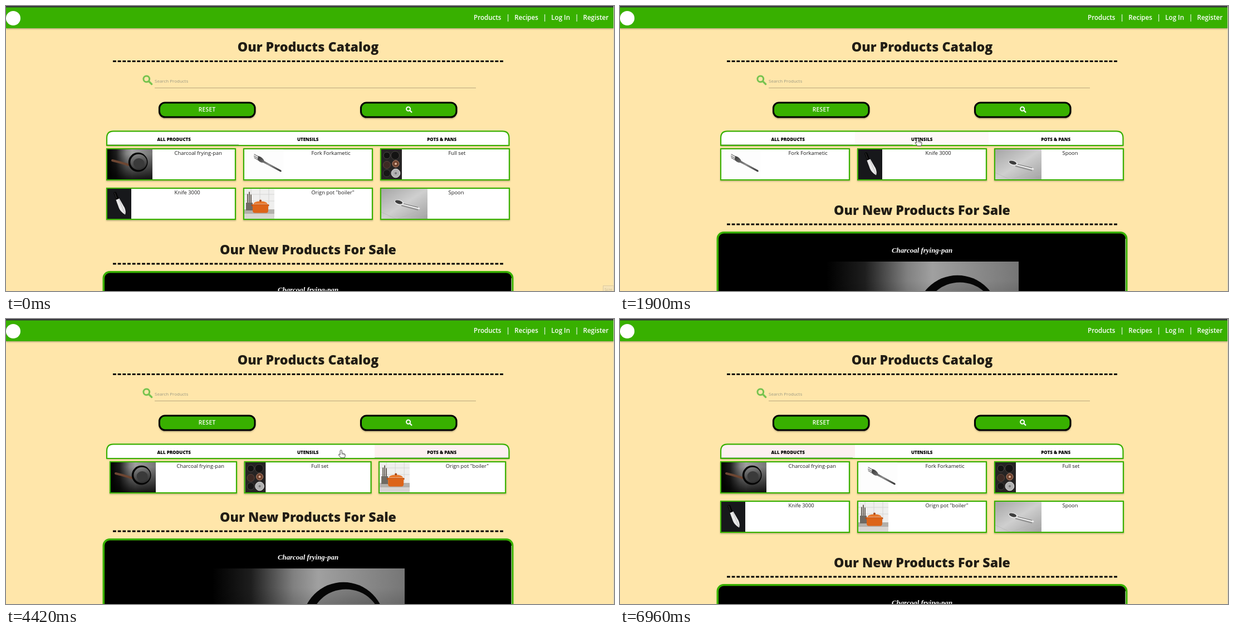
These frames come from a looping animation (1092 by 513 pixels, 7170 ms). An HTML page:

```html
<!DOCTYPE html>
<html lang="en">
<head>
<meta charset="utf-8">
<title>Products catalog</title>
<style>
  html, body { margin: 0; width: 100%; height: 100%; overflow: hidden; background: #ffe6aa; }
  svg { display: block; }
  text { font-family: "Open Sans", sans-serif; }
  .nav { font-size: 11.6px; font-weight: 600; fill: #fff; }
  .head { font-size: 23.2px; font-weight: 800; fill: #211d15; text-anchor: middle; }
  .tab { font-size: 8px; font-weight: 800; fill: #000; text-anchor: middle; }
  .label { font-size: 9.4px; fill: #1c1c1c; }
  .title { font: italic bold 12.9px "Liberation Serif", serif; fill: #fff; text-anchor: middle; }
</style>
</head>
<body>
<svg id="stage" width="1092" height="513" viewBox="0 0 1092 513">
  <defs>
    <linearGradient id="smoke">
      <stop offset="0" stop-color="#000"/><stop offset=".2" stop-color="#1e1e1e"/>
      <stop offset=".42" stop-color="#808080"/><stop offset=".55" stop-color="#a0a0a0"/>
      <stop offset="1" stop-color="#767676"/>
    </linearGradient>
    <linearGradient id="dusk" x2="0" y2="1">
      <stop offset=".15" stop-color="#000" stop-opacity="0"/><stop offset="1" stop-color="#000" stop-opacity=".85"/>
    </linearGradient>
    <linearGradient id="bowl" x2=".3" y2="1">
      <stop offset="0" stop-color="#8a8a8a"/><stop offset=".5" stop-color="#5c5c5c"/>
      <stop offset="1" stop-color="#333"/>
    </linearGradient>
    <linearGradient id="table" x2="1" y2="1">
      <stop offset="0" stop-color="#a5a5a5"/><stop offset=".5" stop-color="#cfcfcf"/>
      <stop offset="1" stop-color="#a2a2a2"/>
    </linearGradient>
    <linearGradient id="steel" x2="1" y2="1">
      <stop offset="0" stop-color="#333"/><stop offset=".5" stop-color="#8c8c8c"/><stop offset="1" stop-color="#333"/>
    </linearGradient>
    <filter id="soft" x="-10%" y="-20%" width="120%" height="160%">
      <feDropShadow dx="0" dy="1.5" stdDeviation="1.2" flood-opacity=".28"/>
    </filter>
  </defs>
</svg>
<script>
const GREEN = '#38b000';
const LOOP = 7170;
const stage = document.getElementById('stage');

const rect = (x, y, w, h, fill, more = '') =>
  `<rect x="${x}" y="${y}" width="${w}" height="${h}" fill="${fill}" ${more}/>`;
const circle = (x, y, r, fill, more = '') =>
  `<circle cx="${x}" cy="${y}" r="${r}" fill="${fill}" ${more}/>`;
const oval = (x, y, rx, ry, fill, more = '') =>
  `<ellipse cx="${x}" cy="${y}" rx="${rx}" ry="${ry}" fill="${fill}" ${more}/>`;
const line = (d, color, width, more = '') =>
  `<path d="${d}" fill="none" stroke="${color}" stroke-width="${width}" ${more}/>`;
const shape = (d, fill, more = '') => `<path d="${d}" fill="${fill}" ${more}/>`;
const text = (cls, x, y, s) => `<text class="${cls}" x="${x}" y="${y}">${s}</text>`;
const round = 'stroke-linecap="round"';

const lens = (x, y, r, w, tail, color) =>
  circle(x, y, r, 'none', `stroke="${color}" stroke-width="${w}"`) +
  line(`M${x + r * .8} ${y + r * .8}l${tail} ${tail}`, color, w * 1.15, round);
const dashes = y => line(`M192 ${y}H893`, '#000', 2.9, 'stroke-dasharray="5.8 2.89"');

// Product pictures, all 54 high
const pictures = {
  pan: [81, rect(0, 0, 81, 54, 'url(#smoke)') + rect(0, 0, 81, 54, 'url(#dusk)') +
    line('M9 20L21 23L38 28', '#6d4632', 4, round) +
    circle(55.2, 23.2, 17.4, '#060606') +
    oval(56.2, 23, 14.8, 14.2, 'url(#bowl)') +
    oval(56.6, 25, 10, 9, '#3a3a3a')],
  fork: [70, rect(0, 0, 70, 54, '#fdfdfd') +
    line('M18 9L27 14M17.5 12L26 17M18 15L26 20', '#686868', 1.3, round) +
    shape('M25 12Q33 14 36 21L66 37.5Q68 40 65 40.5L34 24Q27 24 24 18Z', 'url(#steel)')],
  knife: [43, rect(0, 0, 43, 54, '#17181b') +
    line('M14 8L18 18', '#050505', 5, round) + line('M13 7L16.5 17', '#4a4a4a', .8) +
    shape('M15.5 20L21.5 17.5L31 34Q34 41 32 46.5Q24 42 21 35Z', '#e9e9e9') +
    line('M21 19L31.5 45', '#b9b9b9', 1)],
  set: [37, rect(0, 0, 37, 54, '#262424') +
    circle(10, 11, 6, '#121212', 'stroke="#4a4544"') + circle(25, 11, 7.5, '#141313', 'stroke="#48413f"') +
    circle(10, 28, 6.5, '#3d2a24', 'stroke="#5c463d"') +
    circle(26, 26, 6, '#70432f', 'stroke="#b98870"') + circle(26, 26, 2, '#e0b7a0') +
    circle(10, 43, 6.5, '#171717', 'stroke="#454141"') +
    circle(26, 43, 7.8, '#b2b2b2', 'stroke="#dedede"') + circle(26, 43, 2, '#777')],
  pot: [54, rect(0, 0, 54, 54, '#efefee') +
    line('M0 10H54M0 22H54M12 0V36M28 0V36M44 0V36', '#cfcfcd', .8) +
    rect(0, 37, 54, 17, '#b3b0ab') + rect(0, 45, 54, 9, '#d8d6d3') +
    line('M6 10V28M9 6V28M12 11V28', '#4b4238', 1.6, round) + rect(3, 25, 12, 14, '#6f6a63') +
    rect(12.5, 28, 32, 3.5, '#b94d12', 'rx="1.7"') +
    shape('M15 28.5H43V39Q43 43.5 39 43.5H19Q15 43.5 15 39Z', '#dc6419') +
    shape('M16 27.5Q18 22.5 29 22.5Q40 22.5 42 27.5Z', '#e8772b') + circle(29, 21.5, 2, '#a8450e')],
  spoon: [83, rect(0, 0, 83, 54, 'url(#table)') +
    line('M0 42L26 54M30 54L83 34M52 54L83 44', '#b2b2b2', .6) +
    line('M36 30L66 38', '#8e8e8e', 2) +
    line('M36 27L68 35.5', '#f1f1f1', 2.6, round) + line('M38 26.5L66 33.5', '#555', .9) +
    oval(32, 24.5, 8.5, 4.6, '#e6e6e6', 'transform="rotate(16 32 24.5)"') +
    oval(31.5, 24, 6.8, 3.2, '#3d3d3d', 'transform="rotate(16 31.5 24)"')]
};

const names = {
  pan: 'Charcoal frying-pan', fork: 'Fork Forkametic', set: 'Full set',
  knife: 'Knife 3000', pot: 'Orign pot "boiler"', spoon: 'Spoon'
};

function picture(key, x, y, scale = 1) {
  const [w, art] = pictures[key];
  return `<svg x="${x}" y="${y}" width="${w * scale}" height="${54 * scale}" viewBox="0 0 ${w} 54">${art}</svg>`;
}

function card(key, x, y, w, textX) {
  return rect(x + 1, y + 1, w - 2, 56, '#fff', `stroke="${GREEN}" stroke-width="2.2" filter="url(#soft)"`) +
    picture(key, x + 2, y + 2) + text('label', x + textX, y + 12, names[key]);
}

const wide = (key, i) =>
  card(key, 180 + i % 3 * 246, 256 + Math.floor(i / 3) * 71, 233, 122.5);
const narrow = (key, i) => card(key, 186 + i * 241.6, 256, 229, 120.6);

const pages = [
  { shift: 0, cards: ['pan', 'fork', 'set', 'knife', 'pot', 'spoon'].map(wide) },
  { shift: -71, cards: ['fork', 'knife', 'spoon'].map(wide) },
  { shift: -82, cards: ['pan', 'set', 'pot'].map(narrow) }
];

const button = x => rect(x + 1.5, 174, 171.5, 26, GREEN,
  'rx="10" stroke="#000" stroke-width="3" filter="url(#soft)"');
const tabShape = 'M181 251V237.5Q181 225.3 193 225.3H891.5Q903.5 225.3 903.5 237.5V251Z';
const tabX = [182, 422, 662, 903];

const sale =
  text('head', 542.5, 446.5, 'Our New Products For Sale') + dashes(464) +
  rect(175.3, 478.8, 734.4, 300, '#000', `rx="11" stroke="${GREEN}" stroke-width="3.6"`) +
  line('M908 490V780', '#cfe8c2', 1) +
  text('title', 542.5, 515, 'Charcoal frying-pan') +
  picture('pan', 371, 531, 4.26);

const handPath = 'M-1.6 1.2Q-1.6 -.4 0 -.4T1.6 1.2V5L5.6 6Q7.6 6.5 7.6 8.4V10L6.4 13.4H-.2' +
  'L-4 8.6Q-4.6 6.8 -3 6.8L-1.6 8Z';

stage.insertAdjacentHTML('beforeend',
  rect(0, 0, 1092, 513, '#ffe6aa') +
  rect(0, 2, 1092, 38, GREEN, 'filter="url(#soft)"') + rect(0, 0, 1092, 2.5, '#35393a') +
  circle(13, 22, 13, '#fff') +
  [[840, 'Products'], [898.6, '|'], [913.3, 'Recipes'], [964.6, '|'], [979.3, 'Log In'],
   [1021.9, '|'], [1036.5, 'Register']].map(([x, s]) => text('nav', x, 25, s)).join('') +
  text('head', 542.5, 81.5, 'Our Products Catalog') + dashes(99.5) +
  lens(252.3, 131.3, 5.4, 3, 5, '#76c34f') +
  `<text x="267" y="137.7" font-size="8" fill="#9a9a84">Search Products</text>` +
  rect(267, 147, 577, 1, '#b9a87d') +
  button(274) + button(636) +
  `<text x="361.2" y="190" font-size="10.15" font-weight="600" letter-spacing=".36" fill="#fff" text-anchor="middle">RESET</text>` +
  lens(722.6, 185.2, 3.5, 2, 3, '#fff') +
  shape(tabShape, '#fff', 'filter="url(#soft)"') +
  `<clipPath id="bar"><path d="${tabShape}"/></clipPath><g clip-path="url(#bar)">` +
    [0, 1, 2].map(i => rect(tabX[i], 225, tabX[i + 1] - tabX[i], 26, '#fdf0f0', 'class="tint"')).join('') +
    rect(0, 249, 0, 1, '#a9bd9d', 'id="mark"') + '</g>' +
  shape(tabShape, 'none', `stroke="${GREEN}" stroke-width="2.2"`) +
  ['ALL PRODUCTS', 'UTENSILS', 'POTS &amp; PANS'].map((s, i) =>
    text('tab', [301.7, 542.2, 782.7][i], 242.6, s)).join('') +
  pages.map(p => `<g class="page">${p.cards.join('')}</g>`).join('') +
  `<g id="sale">${sale}</g>` +
  rect(1091, 0, 1, 513, '#dcd6c4') +
  `<g id="tip">${rect(1072.5, 503.5, 19, 12, '#f6e3b6', 'stroke="#dccba0"')}
    <text x="1075" y="513" font-size="7" fill="#c9b98f">Scre</text></g>` +
  circle(0, 0, 9, '#ffeb2e', 'id="glow" opacity=".75"') +
  `<g id="hand">${shape(handPath, '#fff', 'stroke="#333" stroke-width=".9" stroke-linejoin="round"')}
    ${line('M1.6 5V8M3.8 6V8.5M5.8 6.5V9', '#444', .6)}</g>` +
  `<g id="arrow">${shape('M0 0V14L3.3 11L5.6 16.2L7.8 15.2L5.6 10.2H10Z', '#fff', 'stroke="#222" stroke-width=".9"')}</g>`);

const [mark, saleBox, tip, glow, hand, arrow] =
  ['mark', 'sale', 'tip', 'glow', 'hand', 'arrow'].map(id => document.getElementById(id));
const pageEls = [...document.querySelectorAll('.page')];
const tints = [...document.querySelectorAll('.tint')];

const clicks = [{ at: 1825, tab: 1 }, { at: 3525, tab: 2 }, { at: 5305, tab: 0 }];

// Pointer path: time, x, y
const path = [
  [520, 1084, 506], [640, 1040, 470], [780, 930, 385], [900, 800, 300], [1000, 720, 246],
  [1080, 690, 237], [1150, 629, 220], [1220, 549, 231], [1290, 543, 234], [1420, 534, 238],
  [2690, 535, 239], [2800, 582, 243], [2920, 645, 246], [3040, 694, 244], [3190, 719, 240],
  [4140, 717, 239], [4320, 650, 236], [4550, 540, 237], [4840, 410, 237], [5160, 384, 238],
  [5980, 386, 239], [6120, 450, 244], [6300, 610, 285], [6480, 818, 368], [6680, 1037, 490],
  [6750, 1044, 497], [6950, 1056, 514]
];

const clamp = p => Math.max(0, Math.min(1, p));
const mix = (a, b, p) => a + (b - a) * p;
const easeOut = p => 1 - (1 - p) ** 2;
const show = (el, on) => el.setAttribute('display', on ? 'inline' : 'none');

function pointerAt(t) {
  const i = path.findIndex(k => k[0] > t);
  if (i < 1) return null;
  const [a, b] = [path[i - 1], path[i]];
  const p = (t - a[0]) / (b[0] - a[0]);
  return [mix(a[1], b[1], p), mix(a[2], b[2], p)];
}

function drawTabs(t) {
  const done = clicks.filter(c => c.at <= t);
  const last = done[done.length - 1];
  const tab = last ? last.tab : 0;
  const from = done.length > 1 ? done[done.length - 2].tab : 0;
  const age = last ? t - last.at : 1e4;

  pageEls.forEach((el, i) => show(el, i === tab));
  saleBox.setAttribute('transform', `translate(0 ${pages[tab].shift})`);

  // The old tab loses its tint on the press, the new one gains it slowly
  const fade = easeOut(clamp(age / 280));
  tints.forEach((el, i) => el.setAttribute('opacity', last && i === tab ? fade : 0));

  // The leading edge of the marker moves first, the other follows
  const lead = easeOut(clamp(age / 300)), lag = easeOut(clamp((age - 90) / 300));
  const right = i => i ? tabX[i + 1] : 418;
  const forward = tab > from;
  const x0 = mix(tabX[from], tabX[tab], forward ? lag : lead);
  const x1 = mix(right(from), right(tab), forward ? lead : lag);
  mark.setAttribute('x', x0);
  mark.setAttribute('width', x1 - x0);
}

function drawPointer(t) {
  const pos = pointerAt(t);
  const overTabs = pos && pos[1] > 225 && pos[1] < 252 && pos[0] > 181 && pos[0] < 904;
  show(hand, overTabs);
  show(arrow, pos && !overTabs);
  show(glow, clicks.some(c => t >= c.at - 70 && t < c.at));
  if (pos) for (const el of [hand, arrow, glow]) el.setAttribute('transform', `translate(${pos[0]} ${pos[1]})`);
}

function draw(t) {
  drawTabs(t);
  drawPointer(t);
  show(tip, t < 70);
}

const start = performance.now();
function tick() {
  draw((performance.now() - start) % LOOP);
  requestAnimationFrame(tick);
}
draw(0);
requestAnimationFrame(tick);
</script>
</body>
</html>
```
